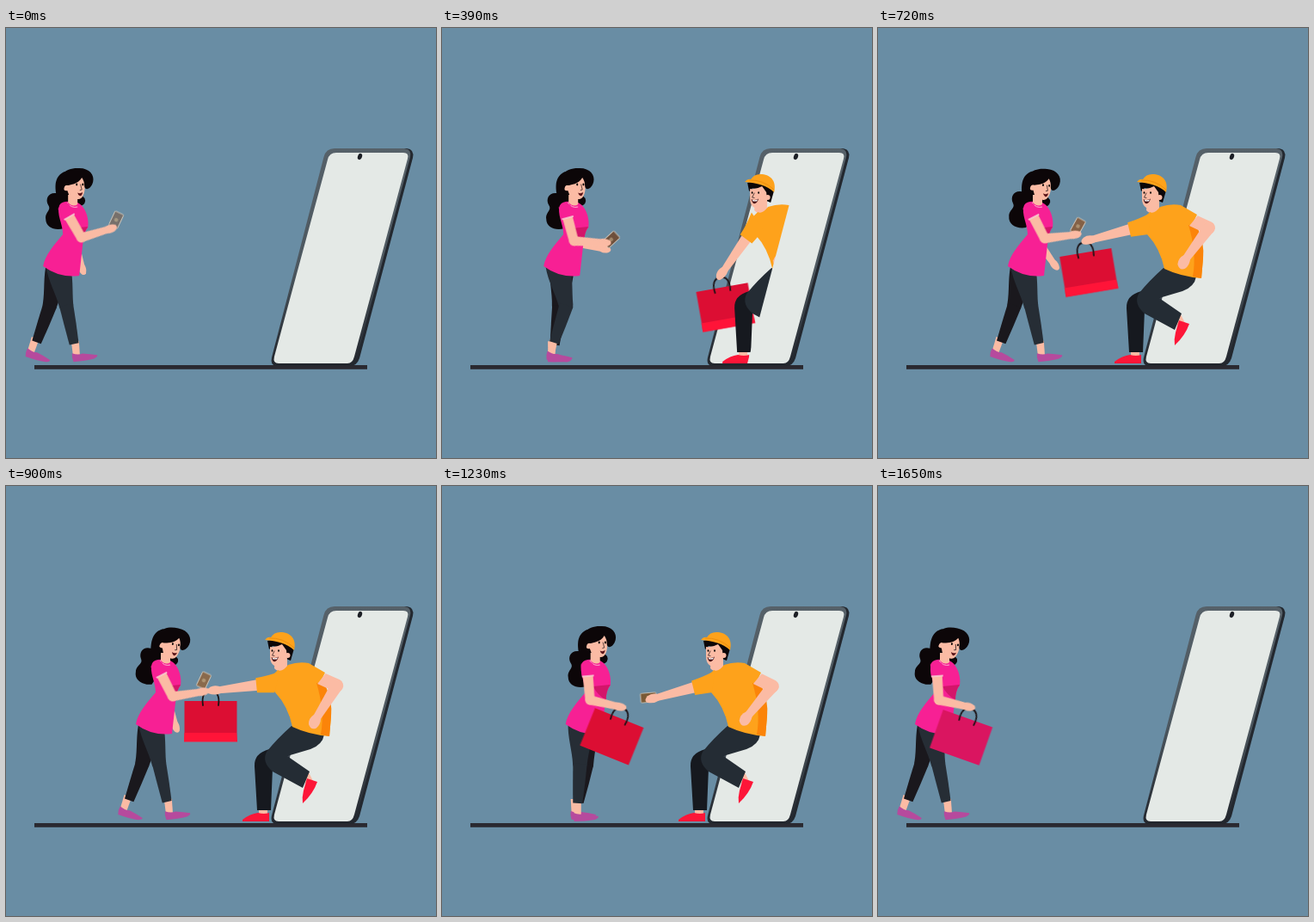
Write an HTML page without scripts that moves like this. It is 500 px wide and 500 px high and loops after 1.83 s.

```html
<!DOCTYPE html>
<html lang="en">
<head>
<meta charset="utf-8">
<title>Delivery from a phone</title>
<style>
html, body { margin: 0; width: 100%; height: 100%; overflow: hidden; background: #698da4; }
svg { display: block; width: 100vw; height: 100vh; }

/* Woman: place, head, arms and legs. All angles are absolute, 0 = straight down. */
@property --wx { syntax: '<length>'; inherits: true; initial-value: 0px; }
@property --head { syntax: '<angle>'; inherits: true; initial-value: 0deg; }
@property --near-up { syntax: '<angle>'; inherits: true; initial-value: 0deg; }
@property --near-fore { syntax: '<angle>'; inherits: true; initial-value: 0deg; }
@property --far-up { syntax: '<angle>'; inherits: true; initial-value: 0deg; }
@property --far-fore { syntax: '<angle>'; inherits: true; initial-value: 0deg; }
@property --a-hip { syntax: '<length>'; inherits: true; initial-value: 62px; }
@property --a-thigh { syntax: '<angle>'; inherits: true; initial-value: 0deg; }
@property --a-shin { syntax: '<angle>'; inherits: true; initial-value: 0deg; }
@property --a-foot { syntax: '<angle>'; inherits: true; initial-value: 0deg; }
@property --b-hip { syntax: '<length>'; inherits: true; initial-value: 60px; }
@property --b-thigh { syntax: '<angle>'; inherits: true; initial-value: 0deg; }
@property --b-shin { syntax: '<angle>'; inherits: true; initial-value: 0deg; }
@property --b-foot { syntax: '<angle>'; inherits: true; initial-value: 0deg; }
/* Man: place, reaching arm, bent arm */
@property --mx { syntax: '<length>'; inherits: true; initial-value: 0px; }
@property --reach { syntax: '<angle>'; inherits: true; initial-value: 0deg; }
@property --bent-up { syntax: '<angle>'; inherits: true; initial-value: 0deg; }
@property --bent-fore { syntax: '<angle>'; inherits: true; initial-value: 0deg; }

svg { animation: walk 1.83s linear infinite, arms 1.83s linear infinite, man 1.83s linear infinite; }

@keyframes walk {
  0%, 29.51%, 60.66%, 90.16%, 100% {
    --a-hip: 62px; --a-thigh: -12deg; --a-shin: -12deg; --a-foot: -4deg;
    --b-hip: 59px; --b-thigh: 12deg; --b-shin: 19.5deg; --b-foot: 20deg;
  }
  6.56%, 83.61% {
    --a-hip: 60px; --a-thigh: 2deg; --a-shin: 3deg; --a-foot: 0deg;
    --b-hip: 66px; --b-thigh: -8deg; --b-shin: 20deg; --b-foot: 12deg;
  }
  13.11% {
    --a-hip: 57px; --a-thigh: 15deg; --a-shin: 11deg; --a-foot: 8deg;
    --b-hip: 73px; --b-thigh: -3deg; --b-shin: -5deg; --b-foot: 0deg;
  }
  21.31% {
    --a-hip: 61px; --a-thigh: -12deg; --a-shin: 18deg; --a-foot: 12deg;
    --b-hip: 64px; --b-thigh: 4deg; --b-shin: 6deg; --b-foot: 2deg;
  }
  67.21% {
    --a-hip: 60px; --a-thigh: 0deg; --a-shin: 3deg; --a-foot: 0deg;
    --b-hip: 66px; --b-thigh: -2deg; --b-shin: 11deg; --b-foot: 0deg;
  }
  77.05% {
    --a-hip: 56px; --a-thigh: 12deg; --a-shin: 8deg; --a-foot: 6deg;
    --b-hip: 72px; --b-thigh: 0deg; --b-shin: -2deg; --b-foot: 0deg;
  }
}
@keyframes arms {
  0% { --wx: 0px; --head: 0deg; --near-up: -30deg; --near-fore: -107deg; --far-up: 7deg; --far-fore: -16deg; }
  13.11% { --wx: 42px; --head: 0deg; --near-up: -3deg; --near-fore: -78deg; --far-up: -6deg; --far-fore: -101deg; }
  29.51% { --wx: 108px; --head: 0deg; --near-up: -27deg; --near-fore: -95deg; --far-up: 9deg; --far-fore: -53deg; }
  49.18% { --wx: 108px; --head: 11deg; --near-up: -27deg; --near-fore: -99deg; --far-up: 7deg; --far-fore: -18deg; }
  60.66% { --wx: 108px; }
  67.21% { --wx: 101px; --head: 0deg; --near-up: -5deg; --near-fore: -77deg; --far-up: 10deg; --far-fore: -10deg; }
  77.05% { --wx: 51px; --head: 10deg; --near-up: -5deg; --near-fore: -77deg; }
  90.16%, 100% { --wx: 0px; --head: 11deg; --near-up: -4deg; --near-fore: -77deg; --far-up: 10deg; --far-fore: -10deg; }
}
@keyframes man {
  0%, 9.84% { --mx: 122px; --reach: -10deg; --bent-up: -15deg; --bent-fore: 66deg; }
  13.11% { --mx: 103px; --reach: 0deg; }
  29.51% { --mx: 0px; --reach: 65.5deg; --bent-up: -61deg; --bent-fore: 41deg; }
  49.18% { --reach: 81deg; --bent-up: -63deg; --bent-fore: 32deg; }
  67.21% { --reach: 73deg; --bent-up: -61deg; --bent-fore: 40deg; }
  72.68% { --mx: 0px; --reach: 71deg; --bent-up: -61deg; --bent-fore: 41deg; }
  77.05% { --mx: 27px; --reach: 49deg; --bent-up: -15deg; --bent-fore: 66deg; }
  90.16%, 100% { --mx: 113px; --reach: -10deg; --bent-up: -15deg; --bent-fore: 66deg; }
}
@keyframes bag {
  0%, 13.11% { transform: translate(425px, 299px) rotate(0deg); }
  21.31% { transform: translate(324px, 290px) rotate(-10deg); }
  29.51% { transform: translate(240.5px, 260.5px) rotate(-19deg); fill: #dc0e33; }
  49.18%, 57% { transform: translate(238px, 238px) rotate(0deg); }
  67.21% { transform: translate(211px, 258.5px) rotate(22deg); fill: #dc0e33; }
  77.05% { transform: translate(160.5px, 259.5px) rotate(20.5deg); fill: #fe1533; }
  90.16%, 100% { transform: translate(108.5px, 259px) rotate(19.5deg); fill: #da1560; }
}
@keyframes fold { 0%, 54% { opacity: 1; } 64%, 100% { opacity: 0; } }
@keyframes item {
  0% { transform: translate(128px, 223px) rotate(25deg); fill: #77706b; }
  13.11% { transform: translate(158px, 257px) rotate(62deg); fill: #5f4636; }
  29.51% { transform: translate(235px, 235px) rotate(33deg); fill: #7d573f; }
  49.18% { transform: translate(230px, 226px) rotate(25deg); fill: #8a6a4c; }
  67.21%, 72.68% { transform: translate(240px, 246px) rotate(85deg); fill: #7a5a36; }
  77.05% { transform: translate(285px, 273px) rotate(55deg); fill: #6aa341; }
  90.16%, 100% { transform: translate(440px, 296px) rotate(40deg); fill: #6aa341; }
}

.woman { transform: translateX(var(--wx)); }
.head { transform: translate(76px, 203px) rotate(var(--head)) translate(-76px, -203px); }
.near { transform: translate(68px, 210px) rotate(var(--near-up)); }
.near .fore { transform: translateY(39px) rotate(calc(var(--near-fore) - var(--near-up))); }
.far { transform: translate(84px, 214px) rotate(var(--far-up)); }
.far .fore { transform: translateY(36px) rotate(calc(var(--far-fore) - var(--far-up))); }
.leg { transform: translate(var(--hip), 284px) rotate(var(--thigh)); }
.shin { transform: translateY(40px) rotate(calc(var(--shin) - var(--thigh))); }
.foot { transform: translateY(55px) rotate(calc(var(--foot) - var(--shin))); }
.a { --hip: var(--a-hip); --thigh: var(--a-thigh); --shin: var(--a-shin); --foot: var(--a-foot); fill: #262d35; }
.b { --hip: var(--b-hip); --thigh: var(--b-thigh); --shin: var(--b-shin); --foot: var(--b-foot); fill: #1a181d; }

.man { transform: translateX(var(--mx)); }
.reach { transform: translate(312px, 226px) rotate(var(--reach)); }
.bent { transform: translate(364px, 222px) rotate(var(--bent-up)); }
.bent .fore { transform: translateY(23px) rotate(calc(var(--bent-fore) - var(--bent-up))); }

.bag { animation: bag 1.83s linear infinite; }
.fold { animation: fold 1.83s linear infinite; fill: #ff1438; }
.item { animation: item 1.83s linear infinite; }

.skin { fill: #fbbba4; }
.hair { fill: #0c0608; }
.pink { fill: #f72094; }
.orange { fill: #fea21b; }
.red { fill: #fd1638; }
.shoe { fill: #b64a9d; }
.line { fill: none; stroke: #1b1114; stroke-linecap: round; }
</style>
</head>
<body>
<svg viewBox="0 0 500 500">
  <defs>
    <linearGradient id="frame" x1="0" y1="0" x2="0" y2="1">
      <stop offset="0" stop-color="#566169"/>
      <stop offset=".55" stop-color="#4c575f"/>
      <stop offset="1" stop-color="#22262d"/>
    </linearGradient>
    <clipPath id="portal"><path d="M0 0H458L326 500H0Z"/></clipPath>
    <g id="shoe">
      <path class="skin" d="M-5-13H4L4 5H-4Z"/>
      <path class="shoe" d="M-5 1Q2 4 7 2Q16 3 24 5Q25 7 20 9Q10 11-4 11Q-6 6-5 1Z"/>
    </g>
    <path id="thigh" d="M-14-10C-15 8-9 24-8.500 40A8.300 8.300 0 0 0 8 40C10 24 15 8 14-10Z"/>
    <path id="calf" d="M-8.300-1L8-1Q7 22 5 45L-6 45Q-7.500 20-8.300-1Z"/>
    <g id="forearm" class="skin">
      <path d="M-5.500 0A5.500 5.500 0 0 1 5.500 0L4 32H-4Z"/>
      <path d="M-4 30Q-6 36-3 41Q0 45 3 42Q6 36 4 30Z"/>
    </g>
  </defs>

  <rect width="500" height="500" fill="#698da4"/>
  <rect x="33" y="392" width="387" height="4.800" fill="#2a2930"/>

  <!-- Big phone -->
  <path d="M384 140H466Q475 141 473 151L411 384Q408 393 400 393H318Z" fill="#23282f"/>
  <path d="M382 140H463Q472 141 470 150L408 383Q405 392 398 393H314Q307 392 309 383L369.500 150Q372 140 382 140Z" fill="url(#frame)"/>
  <path d="M384 145H462Q469 145 467 152L405 382Q403 390 397 390H317Q310 390 312 382L374 153Q376 145 384 145Z" fill="#e4e9e6"/>
  <ellipse cx="411.500" cy="149.500" rx="2.500" ry="3.800" transform="rotate(18 411.500 149.500)" fill="#1d2026"/>

  <!-- Woman -->
  <g class="woman">
    <g class="far">
      <path class="skin" d="M-5 0H5V36A5 5 0 0 1-5 36Z"/>
      <g class="fore"><use href="#forearm" transform="scale(.9)"/></g>
    </g>
    <g class="leg b">
      <use href="#thigh"/>
      <g class="shin"><g class="foot"><use href="#shoe" x="-3" y="-1"/></g><use href="#calf"/></g>
    </g>
    <g class="leg a">
      <use href="#thigh"/>
      <g class="shin"><g class="foot"><use href="#shoe"/></g><use href="#calf"/></g>
    </g>
    <g class="head hair">
      <path d="M68 167C56 172 57 184 58 192C49 191 45 199 49 206C53 212 45 214 46 222C46 232 57 236 67 233L76 212L74 180Z"/>
      <path d="M80 194Q92 194 92 201Q91 208 82 207Z"/>
    </g>
    <path class="pink" d="M62 206C65 201 72 201 83 203C92 207 97 222 95 232C90 238 90 246 89 252L85 288Q62 291 43 277C45 264 56 252 66 240C66 228 58 216 62 206Z"/>
    <path d="M75 233L95 231Q90 238 90 249Q80 243 75 233Z" fill="#d3156a"/>
    <path class="skin" d="M72 194H83L83 205Q78 209 72 203Z"/>
    <path d="M71 203Q76 210 83 208" fill="none" stroke="#fbb3cf"/>
    <g class="head">
      <path class="skin" d="M70 186C70 178 80 174 88 170L91 174Q92 180 91.500 186C91 194 88 200 83 199Q77 198 73 194Z"/>
      <circle class="skin" cx="70" cy="186" r="3.200"/>
      <path class="hair" d="M62 190C57 172 69 162 85 163C97 163 103 171 101 179C99 187 92 190 91 184Q91 178 88 174C83 182 75 182 72 183Q67 181 67 190Z"/>
      <ellipse cx="82" cy="182" rx="1" ry="1.400"/>
      <ellipse cx="89.200" cy="182" rx="1" ry="1.400"/>
      <path class="line" d="M86.500 182L88 188L86 188.500" stroke-width=".7"/>
      <path d="M83 191.500Q86 193 89 191Q88 196 85.500 195Q83.500 194 83 191.500Z" fill="#5a1418"/>
    </g>
  </g>

  <!-- Bag and the thing that is handed over -->
  <g clip-path="url(#portal)">
    <g class="bag" fill="#dc0e33">
      <path d="M-30.500 12H30.500L30.500 59H-30.500Z"/>
      <path class="fold" d="M-30.500 49H30L31 59.500H-31Z"/>
      <path class="line" d="M-9 17C-11 5-6 0 0 0S11 5 9 17" stroke-width="1.800"/>
    </g>
    <g class="item">
      <rect x="-5.500" y="-9" width="11" height="18" rx="1.200" stroke="#ddd3c4" stroke-width=".8"/>
      <circle r="2.300" fill="#d9c7a0" opacity=".45"/>
    </g>
  </g>

  <!-- Man -->
  <g clip-path="url(#portal)">
    <g class="man">
      <path class="skin" d="M294 374H304V382H294ZM343 340L352 333L358 345L350 348Z"/>
      <path class="red" d="M275 388Q284 381 293 380Q300 382 306 380L306 390H275Z"/>
      <path class="red" d="M350 340L362 344Q357 358 345 369Q344 362 346 354Z"/>
      <path d="M306 306Q288 311 289 326L292 377H308L310 328L330 312Z" fill="#16191f"/>
      <path d="M332 279L370 289Q368 301 354 306L327 314L353 332L345 351L310 332Q297 321 303 309Q316 293 332 279Z" fill="#242c34"/>
      <path class="skin" d="M313 198H327V213Q319 219 312 212Z"/>
      <path class="orange" d="M316 214Q321 217 328 208Q340 204 352 206L371 217L365 229Q379 246 378 268L376 291Q352 289 333 280Q328 256 313 240L306 224Z"/>
      <path d="M361 229L371 231Q380 250 378 268L376 291L366 289Q371 262 361 229Z" fill="#fb8409"/>
      <g class="reach">
        <g class="skin">
          <path d="M-4 16H9L5 66H-3Z"/>
          <path d="M-3 64Q-6 70-4 75Q-1 81 3 78Q7 71 5 64Z"/>
        </g>
        <path class="orange" d="M-9-8Q-6 8-6 21L11 22L14 2Z"/>
      </g>
      <g class="bent skin">
        <path d="M-8 2L7 5L8 23A7.500 7.500 0 0 1-7 23Z"/>
        <g class="fore">
          <path d="M-7 0A7 7 0 0 1 7 0L4.500 44H-4.500Z"/>
          <path d="M-4.500 42Q-8 49-4 55Q2 60 6 54Q8 48 4.500 42Z"/>
        </g>
      </g>
      <path class="hair" d="M304 180Q322 176 335 189L331 203L326 201L323 189L310 186L306 190Z"/>
      <path class="skin" d="M307 187Q314 188 321 184L326 191L327 202Q319 211 312 209Q307 206 307 198Z"/>
      <circle class="skin" cx="327.500" cy="197" r="3"/>
      <path class="orange" d="M301 179Q304 175 308 176Q312 169 321 170C332 171 338 179 335 191C327 183 315 180 301 179Z"/>
      <path d="M306 177Q322 176 335 188" fill="none" stroke="#e98909" stroke-width=".8"/>
      <ellipse cx="309.500" cy="191.500" rx=".9" ry="1.300"/>
      <ellipse cx="317" cy="191.500" rx=".9" ry="1.300"/>
      <path class="line" d="M312 192L309.500 197L312 197.500" stroke-width=".7"/>
      <path d="M308.500 199Q313 201 317 198.500Q315 205 311 204Q309 202 308.500 199Z" fill="#4a1216"/>
      <path d="M309.500 199.600Q313 201 316 199.300L315 201.500H310.500Z" fill="#fff"/>
    </g>
  </g>

  <!-- Woman's near arm lies over the bag -->
  <g class="woman">
    <g class="near">
      <path class="skin" d="M-6 4H6L5.500 39A5.500 5.500 0 0 1-5.500 39Z"/>
      <g class="fore"><use href="#forearm"/></g>
      <path class="pink" d="M-7-3Q0-9 7-3L7 11H-7Z"/>
      <path d="M-7 11H7" stroke="#f8cdd3" stroke-width="1.600"/>
    </g>
  </g>
</svg>
</body>
</html>
```
